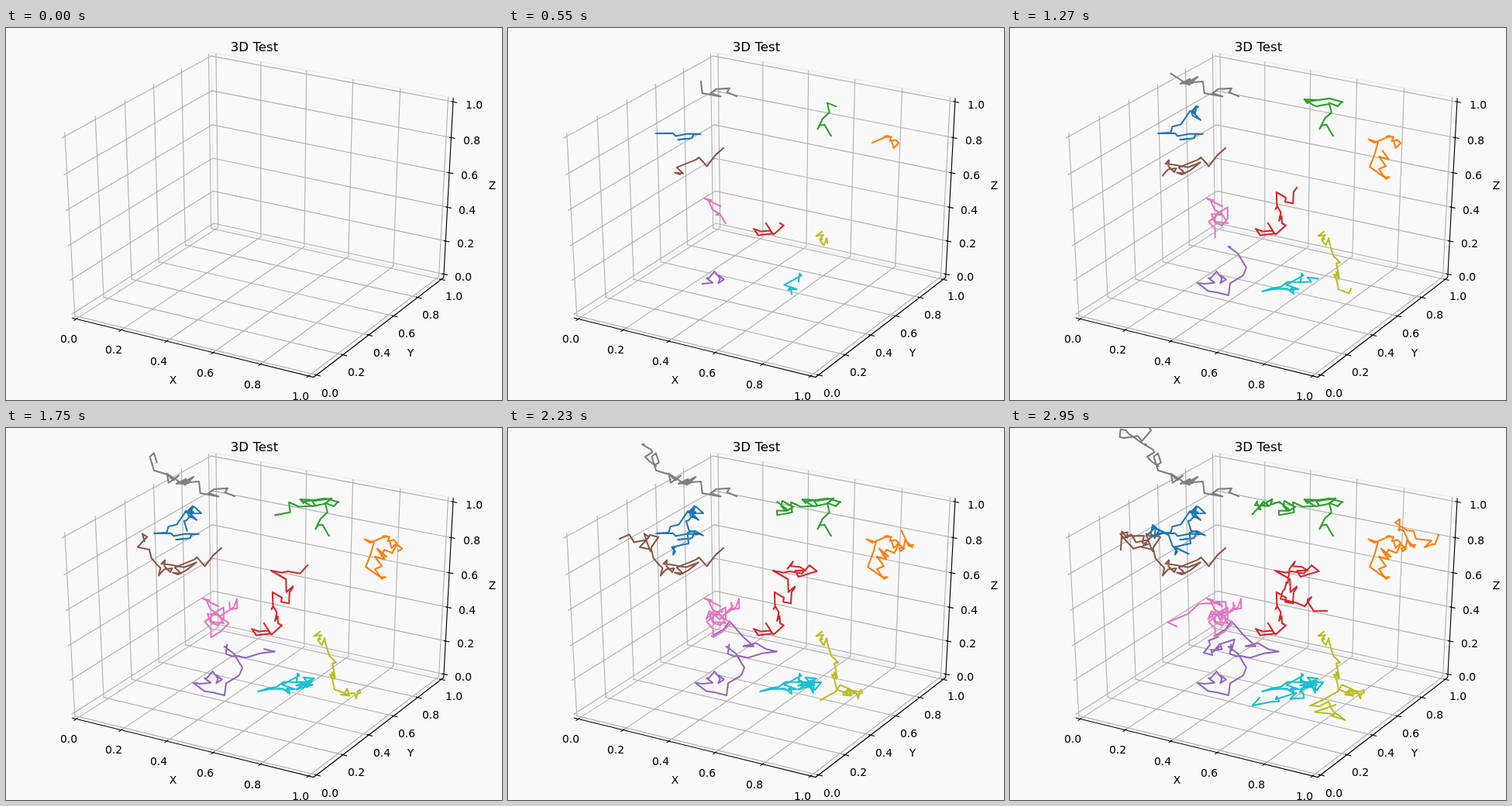
Animation of 640x480 px, one loop 3.01 s. Source, as an HTML page:

```html
<!DOCTYPE html>
<html lang="en">
<head>
<meta charset="utf-8">
<title>3D Test</title>
<style>
  html, body { margin: 0; width: 100%; height: 100%; overflow: hidden; background: #f9f9f9; }
  svg { display: block; width: 640px; height: 480px; }
  polyline { fill: none; stroke-width: 1.11; }
  text { font: 13.89px "DejaVu Sans", sans-serif; text-anchor: middle; fill: #000; }
  .title { font-size: 16.67px; }
  .grid { stroke: #b0b0b0; }
  .axis { stroke: #000; }
  .floor { stroke: #f2f2f2; }
  .wall { stroke: #ebebeb; }
  .walk { stroke-width: 2.08; stroke-linejoin: round; stroke-linecap: square; }
</style>
</head>
<body>
<svg id="stage" viewBox="0 0 640 480"></svg>
<script>
const LOOP = 3010, FIRST = 130, STEP = 60;
const stage = document.getElementById('stage');

function add(tag, attrs, content = '') {
  const el = document.createElementNS('http://www.w3.org/2000/svg', tag);
  for (const name in attrs) el.setAttribute(name, attrs[name]);
  el.textContent = content;
  stage.append(el);
  return el;
}

// Perspective view of the unit cube: elevation 30, azimuth -60, distance 10.
function project([x, y, z]) {
  const a = x - 0.5, b = y - 0.5, c = z - 0.5, h = Math.sqrt(3) / 2;
  const depth = 10 - (a * h / 2 - b * 0.75 + c / 2);
  const right = (a * h + b / 2) / depth;
  const up = (-a / 4 + b * h / 2 + c * h) / depth;
  return [640 * (right + 0.095) / 0.185, 480 * (0.09 - up) / 0.185];
}

const format = pts => pts.map(p => p.map(v => v.toFixed(2)).join()).join(' ');
const line = (cls, ...pts) => add('polyline', { class: cls, points: format(pts.map(project)) });
const label = (x, y, str, cls = '') => add('text', { x, y: Math.round(y), class: cls }, str);

const lo = -1 / 48, hi = 1 + 1 / 48;
const tickIn = hi - 1 / 120, tickOut = hi + 1 / 60;
const near = lo - 0.057, far = hi + 0.057;
const ticks = [0, 0.2, 0.4, 0.6, 0.8, 1];

function tickLabel(point, t) {
  const [x, y] = project(point);
  label(Math.round(x), y + 11, t.toFixed(1));
}

line('floor', [lo, lo, lo], [hi, lo, lo], [hi, hi, lo], [lo, hi, lo], [lo, lo, lo]);
line('wall', [lo, hi, lo], [hi, hi, lo], [hi, hi, hi], [lo, hi, hi], [lo, hi, lo]);

for (const t of ticks) {
  line('grid', [t, lo, lo], [t, hi, lo], [t, hi, hi]);
  line('grid', [lo, t, hi], [lo, t, lo], [hi, t, lo]);
  line('grid', [hi, hi, t], [lo, hi, t], [lo, lo, t]);
}

line('axis', [lo, lo, lo], [hi, lo, lo], [hi, hi, lo], [hi, hi, hi]);

for (const t of ticks) {
  line('axis', [t, 1 - tickIn, lo], [t, 1 - tickOut, lo]);
  line('axis', [tickIn, t, lo], [tickOut, t, lo]);
  line('axis', [tickIn, hi, t], [tickOut, hi, t]);
  tickLabel([t, near, near], t);
  tickLabel([far, t, near], t);
  tickLabel([far, far, t], t);
}

label(215.5, 459, 'X');
label(522, 424, 'Y');
label(627.5, 208, 'Z');
label(320.5, 30, '3D Test', 'title');

// Seeded generator (mulberry32).
function generator(seed) {
  return () => {
    seed = (seed + 0x6d2b79f5) | 0;
    let n = Math.imul(seed ^ (seed >>> 15), seed | 1);
    n ^= n + Math.imul(n ^ (n >>> 7), n | 61);
    return ((n ^ (n >>> 14)) >>> 0) / 2 ** 32;
  };
}

const SPAN = 8, REACH = 0.1;
const centre = project([0.5, 0.5, 0.5]);

// One random step inside a small cube, as seen on the stage.
function randomStep(rand) {
  const offset = () => 0.5 + (rand() - 0.5) * REACH;
  return project([offset(), offset(), offset()]).map((v, i) => v - centre[i]);
}

// Random walk that passes through one key point every SPAN steps.
function randomWalk(keys, rand) {
  const points = [keys[0]];
  for (let k = 1; k < keys.length; k++) {
    const steps = Array.from({ length: SPAN }, () => randomStep(rand));
    const drift = [0, 1].map(i =>
      (keys[k][i] - keys[k - 1][i] - steps.reduce((sum, s) => sum + s[i], 0)) / SPAN);
    for (const step of steps) {
      const last = points[points.length - 1];
      points.push(last.map((v, i) => v + step[i] + drift[i]));
    }
  }
  return points;
}

const walks = [
  ['#1f77b4', '229,143 191,136 234,108 232,109 233,149 185,128 176,139'],
  ['#ff7f0e', '495,146 470,148 476,182 488,157 522,154 497,122 553,138'],
  ['#2ca02c', '417,139 423,101 384,97 388,101 354,94 327,95 313,111'],
  ['#d62728', '333,252 351,252 356,219 342,184 384,184 352,210 409,236'],
  ['#9467bd', '272,319 251,330 305,309 298,294 303,269 250,290 286,287'],
  ['#8c564b', '278,155 222,189 212,186 185,157 183,138 178,150 143,157'],
  ['#e377c2', '274,230 281,252 260,240 294,231 260,236 279,238 215,256'],
  ['#7f7f7f', '295,88 249,69 220,72 208,60 177,37 151,5 174,-10'],
  ['#bcbd22', '405,263 412,277 418,318 452,349 452,344 411,353 420,357'],
  ['#17becf', '375,327 366,343 374,328 394,325 396,338 367,349 322,348']
].map(([stroke, path], i) => {
  const keys = path.split(' ').map(p => p.split(',').map(Number));
  return {
    el: add('polyline', { class: 'walk', stroke }),
    points: randomWalk(keys, generator(i + 1))
  };
});

const start = performance.now();
let shown = -1;

function draw(now) {
  const t = Math.max(0, now - start) % LOOP;
  const count = t < FIRST ? 0 : Math.floor((t - FIRST) / STEP) + 2;
  if (count !== shown) {
    shown = count;
    for (const { el, points } of walks) {
      el.setAttribute('points', format(points.slice(0, count)));
    }
  }
  requestAnimationFrame(draw);
}
draw(start);
</script>
</body>
</html>
```
